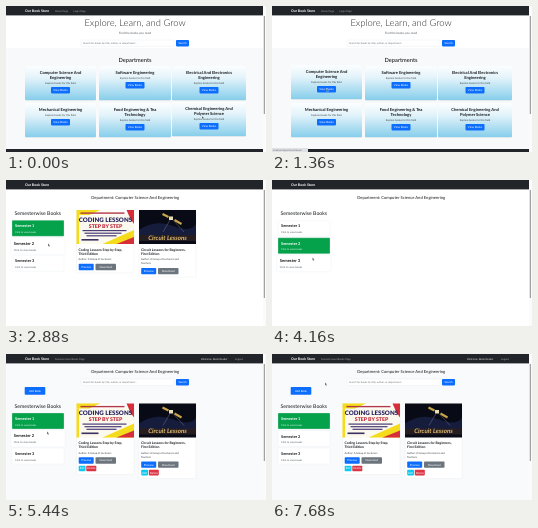
Animation of 260 by 146 pixels, one loop 8 s. Source, as an HTML page:

```html
<!DOCTYPE html>
<html lang="en">
<head>
<meta charset="utf-8">
<title>Book store walkthrough</title>
<style>
html, body { margin: 0; width: 100%; height: 100%; overflow: hidden; background: #fff; }
svg { display: block; width: 100vw; height: 100vh; }
text { font-family: Lato, "Open Sans", sans-serif; text-rendering: geometricPrecision; }
</style>
</head>
<body>
<svg id="stage" viewBox="0 0 260 146" preserveAspectRatio="none"></svg>
<script>
const LOOP = 8000;
const BLUE = '#0d6efd', GREY = '#6c757d', DARK = '#16191c', BAR = '#212529', GREEN = '#05a14b';
const stage = document.getElementById('stage');

const rect = (x, y, w, h, fill, extra = '') =>
  `<rect x="${x}" y="${y}" width="${w}" height="${h}" fill="${fill}" ${extra}/>`;
const shape = (d, fill) => `<path d="${d}" fill="${fill}"/>`;
const text = (x, y, size, str, fill = DARK, weight = 400, anchor = 'start') =>
  `<text x="${x}" y="${y}" font-size="${size}" fill="${fill}" font-weight="${weight}" text-anchor="${anchor}">${str}</text>`;
const mid = (x, y, size, str, fill, weight) => text(x, y, size, str, fill, weight, 'middle');
const move = (x, y, body) => `<g transform="translate(${x} ${y})">${body}</g>`;
const button = (x, y, w, label, fill = BLUE, h = 6.4) =>
  rect(x, y, w, h, fill, 'rx=".8"') + mid(x + w / 2, y + h / 2 + 0.95, 2.8, label, '#fff');
const ramp = (t, start, length) => Math.min(1, Math.max(0, (t - start) / length));

// Pointer positions: time, x, y
const path = [
  [0, 196, 110], [160, 196, 110], [480, 190, 86], [560, 190, 86], [640, 96.5, 84],
  [960, 58, 85], [1200, 58, 85], [1360, 54.5, 82.5], [2640, 54.5, 82.5], [2880, 42, 63.5],
  [3920, 42, 63.5], [4160, 40.5, 77.5], [5280, 40.5, 77.5], [5440, 41, 77.5], [6880, 41, 77.5],
  [6960, 46, 67], [7440, 46, 67], [7680, 53, 28.5], [LOOP, 53, 28.5]
];

function pointerAt(t) {
  const i = path.findIndex(p => p[0] > t);
  const [t0, x0, y0] = path[i - 1], [t1, x1, y1] = path[i];
  const k = (t - t0) / (t1 - t0);
  return [x0 + (x1 - x0) * k, y0 + (y1 - y0) * k];
}

const pointer = ([x, y]) => move(x, y,
  '<path d="M0 0V2.9L.7 2.3L1.2 3.4L1.7 3.2L1.2 2.1H2Z" fill="#333" stroke="#fff" stroke-width=".3"/>');

const link = (x, str, fill = '#a5a8ab') => text(x, 5.8, 2.6, str, fill);

function navbar(links = '') {
  return rect(0, 0, 257, 9.4, BAR) + text(19, 6, 3.5, 'Our Book Store', '#fff', 700) + links;
}

const scrollbar = end => rect(257, 0, 3, 146, '#fbfbfb') + rect(257.8, 10, 1, end - 10, '#8b8b8b');

const search = y => rect(75, y, 93, 6.4, '#fff', 'rx="1" stroke="#dee2e6" stroke-width=".3"') +
  text(77, y + 4, 2.5, 'Search for books by title, author, or department...', '#6a7076') +
  button(170, y, 13, 'Search');

const status = rect(0, 142, 36, 4, '#dfe1e5') + text(1, 144.8, 2.3, 'localhost/department/books', '#666');

// Cards: x, y, width, title lines, start and end of hover
const cards = [
  [19, 60, 71, ['Computer Science And', 'Engineering'], 800, 2200],
  [93, 60, 72, ['Software Engineering'], 640, 760],
  [166, 60, 74, ['Electrical And Electronics', 'Engineering'], 320, 600],
  [19, 97, 71, ['Mechanical Engineering'], -1, -1],
  [93, 97, 72, ['Food Engineering &amp; Tea', 'Technology'], -1, -1],
  [166, 97, 74, ['Chemical Engineering And', 'Polymer Science'], -300, 200]
];

function card([x, y, w, lines, on, off], t) {
  const c = w / 2, low = 5 * (lines.length - 1);
  const lift = on === off ? 0 : ramp(t, on, 200) - ramp(t, off, 200);
  return move(x, y - lift,
    rect(0, 0.5, w, 34.3, '#d8e3e9', 'rx="1"') +
    rect(0, 0, w, 34, 'url(#sky)', 'rx="1"') +
    lines.map((s, i) => mid(c, 7.5 + 5 * i, 4.1, s, DARK, 700)).join('') +
    mid(c, 12.8 + low, 2.6, 'Explore books for this field', '#444') +
    button(c - 9.5, 16 + low, 19, 'View Books'));
}

function home(t) {
  return rect(0, 0, 260, 146, '#fff') + rect(0, 42, 257, 101, '#f8f9fa') +
    navbar(link(49, 'Home Page') + link(67.5, 'Login Page')) +
    mid(129, 20.2, 9.4, 'Explore, Learn, and Grow', '#25292d', 300) +
    mid(129, 28, 3, 'Find the books you need', '#555b60') + search(34) +
    mid(129, 55.5, 5.7, 'Departments', DARK, 500) +
    cards.map(c => card(c, t)).join('') +
    rect(0, 143, 257, 3, BAR) + scrollbar(108) + (t >= 1360 ? status : '');
}

const codingCover =
  rect(0, 0, 57.5, 34, '#fbf8ee') + shape('M0 0H24L13 5H0Z', '#f4dc1c') + shape('M24 0H57.5V4L13 5Z', '#fff') +
  rect(4, 2.4, 44, 1.4, '#b23a46') + shape('M50 0H57.5V14L54 9Z', '#d62f3a') +
  rect(0, 5, 2.5, 29, '#f4dc1c') +
  mid(29, 11.8, 6.2, 'CODING LESSONS', '#2a2560', 900) + mid(29, 17.6, 5.2, 'STEP BY STEP', '#c22a3c', 900) +
  [0, 1, 2].map(i => rect(6 + 2 * i, 20 + 2.6 * i, 44 - 7 * i, 1.2, '#4a3c78')).join('') +
  shape('M57.5 20V34H26Z', '#f4dc1c') + shape('M57.5 27V34H40Z', '#d62f3a') + rect(5, 29, 17, 1.6, '#3a3263');

const circuitCover =
  rect(0, 0, 57, 34, '#080b16') + shape('M0 20Q16 9 34 16T57 14V26H0Z', '#161d3c') +
  shape('M24 3L30 6L29 8L23 5ZM36 9L43 13L42 15L35 11Z', '#c9a54a') + rect(30, 6.5, 4, 3.5, '#e9dfb4') +
  '<path d="M31 10L24 22M34 10L45 22" stroke="#6d6a8e" stroke-width=".5"/>' +
  rect(0, 25, 57, 6, '#261d20') +
  '<g font-style="italic">' + mid(28.5, 29.8, 6.2, 'Circuit Lessons', '#e0bd72', 700) + '</g>';

const books = [
  { x: 70.5, w: 57.5, cover: codingCover, title: ['Coding Lessons Step by Step,', 'Third Edition'], by: ['Author: A Group of Lecturers'] },
  { x: 133, w: 57, cover: circuitCover, title: ['Circuit Lessons for Beginners,', 'First Edition'], by: ['Author: A Group of Lecturers and', 'Teachers'] }
];

function book({ x, w, cover, title, by }, y, member) {
  const row = 54 + 4.1 * (by.length - 1);
  return move(x, y,
    rect(0, 0, w, row + (member ? 17 : 9), '#fff', 'rx=".7" stroke="#dfe2e5" stroke-width=".3"') + cover +
    title.map((s, i) => text(2, 40.7 + 4.1 * i, 3.4, s, DARK, 700)).join('') +
    by.map((s, i) => text(2, 50.2 + 3.8 * i, 2.6, s, '#33383c')).join('') +
    button(2.2, row - 0.2, 15, 'Preview') + button(19, row - 0.2, 20.5, 'Download', GREY) +
    (member ? button(2.2, row + 8.2, 6.8, 'Edit', '#0dcaf0', 5.6) + button(9.8, row + 8.2, 10, 'Delete', '#dc3545', 5.6) : ''));
}

function semester(i, y, active, hover) {
  const zoom = hover ? 'translate(26 8) scale(1.05) translate(-26 -8)' : '';
  const on = i === active;
  return move(6, y + 17.5 * i, `<g transform="${zoom}">` +
    rect(0, 0, 52, 16, on ? GREEN : '#fff', 'rx=".7" stroke="#e8ebed" stroke-width=".3"') +
    text(3, 7, 3.9, 'Semester ' + (i + 1), on ? '#fff' : DARK, 700) +
    text(3, 12.5, 2.5, 'Click to view books', on ? '#e4f6eb' : '#555b60') + '</g>');
}

function department(t, [px, py]) {
  const member = t >= 5280;
  const active = member || t < 3360 ? 0 : t < 4560 ? 1 : 2;
  const top = member ? 59 : 40.3;
  const over = px > 6 && px < 58 ? Math.floor((py - top) / 17.5) : -1;
  const links = link(49, 'Semesterwise Books Page') +
    link(195, 'Welcome, Book Reader', '#e4e5e6') + link(229, 'Logout');
  let out = rect(0, 0, 260, 146, member ? '#f8fafb' : '#fff') + navbar(member ? links : '') +
    mid(129.2, 18.9, 4.15, 'Department: Computer Science And Engineering') +
    text(8.5, top - 5.2, 5.15, 'Semesterwise Books');
  if (member) out += search(25) + button(18.7, 33.1, 20.6, 'Add Book', BLUE, 7.7);
  // The hovered entry is drawn last, above its neighbours
  out += [0, 1, 2].sort((a, b) => (a === over) - (b === over))
    .map(i => semester(i, top, active, i === over)).join('');
  if (active === 0) out += books.map(b => book(b, member ? 49.5 : 30, member)).join('');
  return out + scrollbar(member ? 107 : 118) + (t < 2720 ? status : '');
}

const defs = '<defs><linearGradient id="sky" x1="0" y1="0" x2="0" y2="1">' +
  '<stop stop-color="#fcfeff"/><stop offset=".35" stop-color="#e3f3fa"/><stop offset="1" stop-color="#87ceeb"/>' +
  '</linearGradient></defs>';

function draw(now) {
  const t = now % LOOP, p = pointerAt(t);
  stage.innerHTML = defs + (t < 2000 ? home(t) : department(t, p)) + pointer(p);
  requestAnimationFrame(() => draw(performance.now()));
}
draw(0);
</script>
</body>
</html>
```
